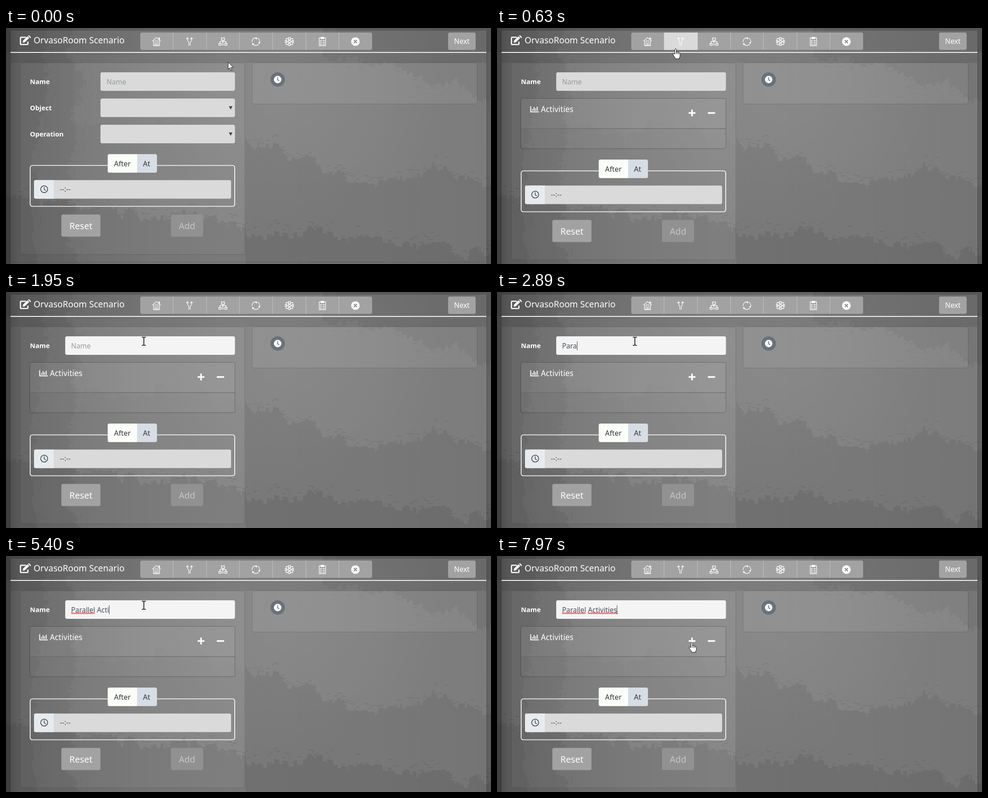
Animation of 1073 by 522 pixels, one loop 8000 ms. Source, as an HTML page with a canvas:

```html
<!DOCTYPE html>
<html lang="en">
<head>
<meta charset="utf-8">
<title>Scenario form</title>
<style>
html, body { margin: 0; width: 100%; height: 100%; overflow: hidden; background: #555; }
canvas, svg { position: absolute; left: 0; top: 0; width: 1073px; height: 522px; }
text { font: 15.4px "Noto Sans", "Open Sans", sans-serif; fill: #fff; white-space: pre; }
.b { font-weight: 700; font-size: 14.7px; }
.title { font-size: 19.3px; }
.big { font-size: 19.6px; }
.head { font-size: 17.3px; }
.ink { fill: #495057; }
.dark { fill: #30363c; }
.hint { fill: #969a9e; }
.input { fill: #dadada; }
.btn { fill: #a2a2a2; }
.card { fill: #fff; fill-opacity: .04; }
.edge { fill: none; stroke: #000; stroke-opacity: .17; }
.line { fill: none; stroke: #fff; stroke-width: 1.3; }
</style>
</head>
<body>
<canvas id="bg" width="1073" height="522"></canvas>
<svg viewBox="0 0 1073 522">
  <rect id="frame" class="edge" x="9.5" y="5.5" width="1054" height="512" rx="4"/>
  <rect x="10" y="53" width="1053" height="2" fill="#f2f2f2"/>

  <!-- header -->
  <g transform="translate(30 16)">
    <path d="M14 4.500H3.500Q2 4.500 2 6V19Q2 20.500 3.500 20.500H17Q18.500 20.500 18.500 19V14" fill="none" stroke="#fff" stroke-width="2.6"/>
    <path d="M7 16.500L7.600 12 17.500 2.200 21.300 6 11.500 15.800ZM18.600 1.100Q20.300-.6 22 1.100L24.400 3.500Q26 5.200 24.400 6.800L22.400 4.900Z" fill="#fff"/>
  </g>
  <text class="title" x="61" y="34">OrvasoRoom</text>
  <text class="title" x="184" y="34">Scenario</text>
  <rect class="btn" x="297" y="10" width="513" height="38.500" rx="4"/>
  <path id="seams" stroke="#c0c0c0" stroke-width="1"/>
  <rect id="hover" x="370" y="10" width="74" height="38.500" fill="#dadada" opacity="0"/>
  <g class="line">
    <g transform="translate(333 30)">
      <path d="M-9-1L0-9 9-1M-6.500-2V9H6.500V-2M5-5V-8H7V-3"/>
      <path d="M-4-2H4M-5 1H5M-5 4H-2M2 4H5M-5 7H-2M2 7H5M-1 9V4H1V9" stroke-width="1"/>
    </g>
    <path id="fork" transform="translate(406 30)" d="M-1.500 9V4Q-1.500 1-3.500-1-4.500-3-4.500-8M-7-5.500L-4.500-8.500-2-5.500M1.500 9V4Q1.500 1 3.500-1 4.500-3 4.500-8M2-5.500L4.500-8.500 7-5.500"/>
    <path transform="translate(480 30)" d="M-3.500-8H3.500V-3H-3.500ZM-9 4H-4V8H-9ZM4 4H9V8H4ZM0-3V6M-6.500 4V0H6.500V4M-2 7H2"/>
    <g transform="translate(553 30)">
      <path d="M-8.500 1A8.500 8.500 0 0 1 2-8.200M4.500-7.300A8.500 8.500 0 0 1 8 2.500M6 6A8.500 8.500 0 0 1-7 5"/>
      <path d="M-1-9L4-7.500 0-4.500ZM9.500 1L7 6 5 1.500ZM-8.500 8L-8.500 3-4 5Z" fill="#fff" stroke="none"/>
    </g>
    <path transform="translate(627 30)" d="M-2.500-8.500H2.500V-4.500H-2.500ZM-2.500-2H2.500V2H-2.500ZM-2.500 4.500H2.500V8.500H-2.500ZM-9-2H-6V2H-9ZM6-2H9V2H6ZM-2.500-6.500H-7.500V-2M-7.500 2V6.500H-2.500M2.500-6.500H7.500V-2M7.500 2V6.500H2.500M0-4.500V-2M0 2V4.500M-6 0H-2.500M2.500 0H6"/>
    <g transform="translate(700 30)">
      <path d="M-7-8H7V9H-7ZM-3-9.500H3V-6.500H-3Z"/>
      <path d="M-5-2L-4-1-2-3.500M0-2H5M-5 2L-4 3-2 .5M0 2H5M-5 6L-4 7-2 4.500M0 6H5"/>
    </g>
  </g>
  <circle cx="773" cy="30" r="9.500" fill="#fff"/>
  <path d="M769.500 26.500l7 7m0-7l-7 7" stroke="#929292" stroke-width="2.300"/>
  <rect class="btn" x="978" y="10" width="61" height="38.500" rx="4"/>
  <text x="1008.500" y="35" text-anchor="middle" style="font-size:15.700px">Next</text>

  <!-- panels -->
  <rect id="panel" class="card" x="31" y="77" width="497" height="424" rx="4"/>
  <rect id="panelEdge" class="edge" x="31.500" y="77" width="497" height="424" rx="4"/>
  <rect class="card" x="544" y="77" width="498" height="91" rx="4" style="fill-opacity:.07"/>
  <rect class="edge" x="544.500" y="77" width="498" height="91" rx="4"/>
  <circle cx="601" cy="114" r="16" fill="#69727b"/>
  <circle cx="601" cy="114" r="8.300" fill="#fff"/>
  <path d="M601 109V114.500L604 117" fill="none" stroke="#69727b" stroke-width="1.700"/>

  <text class="b" x="53" y="124">Name</text>
  <g id="single">
    <rect class="input" x="209" y="98" width="297.500" height="41" rx="4"/>
    <text class="hint" x="222.500" y="125">Name</text>
    <text class="b" x="53" y="182">Object</text>
    <text class="b" x="53" y="240">Operation</text>
    <rect class="input" x="209" y="156" width="297.500" height="41" rx="4"/>
    <rect class="input" x="209" y="214" width="297.500" height="41" rx="4"/>
    <path d="M493 173h8l-4 7.500zM493 231h8l-4 7.500z" fill="#464646"/>
  </g>
  <g id="multi">
    <rect id="name" x="131" y="98" width="375.500" height="41" rx="4"/>
    <text id="hint" class="hint" x="144" y="125">Name</text>
    <text id="typed" class="ink" x="144" y="125"></text>
    <path id="wave1" fill="none" stroke="#e02f35" stroke-width="1.100"/>
    <path id="wave2" fill="none" stroke="#e02f35" stroke-width="1.100"/>
    <rect id="caret" y="109" width="1" height="20" fill="#444"/>
    <rect class="card" x="53" y="156" width="453.500" height="110.500" rx="4"/>
    <rect class="card" x="53" y="156" width="453.500" height="66" rx="4"/>
    <rect class="edge" x="52.500" y="155.500" width="454" height="111.500" rx="4" style="stroke-opacity:.27"/>
    <path d="M53 222.500H506" stroke="#666"/>
    <path d="M74.500 173V185.500H92.500M78.500 183V179M82 183V175M85.500 183V177.500M89 183V174" fill="none" stroke="#fff" stroke-width="1.900"/>
    <text class="head" x="97" y="186">Activities</text>
    <path d="M424 188h15m-7.500-7.500v15M466.500 188h16" stroke="#fff" stroke-width="3.400"/>
  </g>

  <!-- schedule and actions -->
  <g id="lower">
    <rect class="line" x="53.500" y="304" width="452.500" height="90.500" rx="5" style="stroke-width:1.700"/>
    <path d="M229 279H290V320H229Q225 320 225 316V283Q225 279 229 279Z" fill="#fbfdf9"/>
    <path d="M290 279H330Q334 279 334 283V316Q334 320 330 320H290Z" fill="#d7dde4"/>
    <text class="dark" x="239" y="306" style="font-size:15.900px">After</text>
    <text class="dark" x="303" y="306" style="font-size:15.900px">At</text>
    <rect class="input" x="62" y="336.500" width="436" height="41" rx="4"/>
    <path d="M106 336.500H66Q62 336.500 62 340.500V373.500Q62 377.500 66 377.500H106Z" fill="#e8ebee"/>
    <path d="M106.500 336.500V377.500" stroke="#cfd4d9"/>
    <circle cx="84.500" cy="356.500" r="7.700" fill="none" stroke="#495057" stroke-width="1.700"/>
    <path d="M84.500 351.500V357L88 359.500" fill="none" stroke="#495057" stroke-width="1.600"/>
    <text class="ink" x="119" y="362">--:--</text>
    <rect class="btn" x="122.500" y="412.500" width="86.500" height="49" rx="4"/>
    <text class="big" x="165.700" y="444.500" text-anchor="middle">Reset</text>
    <rect x="365" y="412.500" width="71" height="49" rx="4" fill="#919191"/>
    <text class="big" x="400.500" y="444.500" text-anchor="middle" style="fill:#c6c6c6">Add</text>
  </g>

  <!-- pointers, origin at the hot spot -->
  <path id="arrow" d="M.5.500V16.500L4.200 13 6.800 19.200 9.200 18.200 6.600 12.200H11.700Z" fill="#fff" stroke="#111"/>
  <path id="hand" d="M-1.800 1.500Q-1.600 0 0 0 1.700 0 1.700 1.500V8Q2 6.800 3.300 6.900 4.700 7 4.800 8.300 5.200 7.400 6.300 7.600 7.500 7.900 7.500 9 8.200 8.400 9.100 8.800 10 9.300 10 10.500V15Q10 17.500 8.500 19.500V22H-.8V20Q-3 17.500-4.200 14.800L-5.800 12Q-6.300 10.500-5 10-3.500 9.700-1.800 12ZM1.700 8V12M4.800 8.300V12M7.500 9V12" fill="#fff" stroke="#111"/>
  <path id="beam" d="M-4.500-9H-1.500L0-8 1.500-9H4.500M0-8V8M-4.500 9H-1.500L0 8 1.500 9H4.500" fill="none" stroke="#111" stroke-width="1.700"/>
</svg>
<script>
const $ = id => document.getElementById(id);
const LOOP = 8000, W = 1073, H = 522;

// ---- soft, posterised backdrop ----
const ctx = $('bg').getContext('2d');
let seed = 11;
const rnd = () => (seed = seed * 16807 % 2147483647) / 2147483647;

function lerp(pts, p) {
  let i = 1;
  while (i < pts.length - 1 && pts[i][0] < p) i++;
  const [a, u] = pts[i - 1], [b, v] = pts[i];
  return u + (v - u) * (p - a) / (b - a);
}

// Tint one side of a ragged contour; "upright" swaps the axes.
function ridge(pts, far, tint, rough, upright) {
  const put = (a, b, n, m) => upright ? ctx.rect(b, a, m, n) : ctx.rect(a, b, n, m);
  const end = pts[pts.length - 1][0], dir = Math.sign(far - pts[0][1]);
  let drift = 0;
  ctx.fillStyle = tint;
  ctx.beginPath();
  for (let p = pts[0][0]; p < end;) {
    const n = 2 + Math.floor(rnd() * 8);
    drift = drift * .75 + (rnd() - .5) * rough;
    const edge = Math.round((lerp(pts, p) + drift) / 2) * 2;
    put(p, Math.min(edge, far), Math.min(n, end - p), Math.abs(far - edge));
    if (rnd() < .4) put(p, edge - dir * (4 + Math.floor(rnd() * rough)), n + 2, 2);
    p += n;
  }
  ctx.fill();
}

function backdrop() {
  const base = ctx.createLinearGradient(0, 0, W, 0);
  [[0, '#5c5c5c'], [.03, '#6c6c6c'], [.14, '#757575'], [.3, '#7f7f7f'], [.45, '#838383'], [.75, '#808080'], [1, '#7c7c7c']]
    .forEach(([o, c]) => base.addColorStop(o, c));
  ctx.fillStyle = base;
  ctx.fillRect(0, 0, W, H);
  const glow = ctx.createRadialGradient(640, 120, 20, 640, 120, 330);
  glow.addColorStop(0, 'rgba(255,255,255,.06)');
  glow.addColorStop(1, 'rgba(255,255,255,0)');
  ctx.fillStyle = glow;
  ctx.fillRect(0, 0, W, H);

  ridge([[0, 150], [90, 160], [180, 142], [240, 162], [330, 126], [430, 145], [522, 160]], 0, 'rgba(0,0,0,.05)', 22, true);
  ridge([[0, 92], [150, 84], [260, 66], [400, 50], [522, 60]], 0, 'rgba(0,0,0,.05)', 14, true);
  ridge([[150, 210], [220, 225], [300, 240], [340, 205], [410, 222], [530, 250]], 60, 'rgba(255,255,255,.018)', 18);
  ridge([[530, 250], [610, 275], [700, 320], [800, 350], [900, 335], [970, 310], [1073, 350]], H, 'rgba(0,0,0,.065)', 20);
  ridge([[0, 372], [120, 395], [240, 405], [340, 425], [440, 415], [530, 442]], H, 'rgba(0,0,0,.08)', 20);
  ridge([[530, 445], [650, 450], [760, 462], [860, 478], [960, 500], [1073, 488]], H, 'rgba(0,0,0,.08)', 22);
  ridge([[700, 58], [790, 76], [880, 96], [960, 120], [1073, 160]], 0, 'rgba(0,0,0,.055)', 18);

  ctx.fillStyle = 'rgba(0,0,0,.09)';
  ctx.fillRect(0, 0, W, 53);
  ctx.fillRect(10, 55, 1053, 22);
  ctx.fillStyle = 'rgba(0,0,0,.2)';
  ctx.fillRect(0, 0, 10, H);
  ctx.fillRect(1063, 0, 10, H);
  ctx.fillRect(10, 0, 1053, 5);
}
backdrop();

// ---- timeline ----
const pointer = [
  [0, 491, 75, 'arrow'], [80, 481, 70, 'arrow'], [160, 459, 62, 'arrow'], [240, 435, 53, 'arrow'],
  [310, 415, 37, 'hand'], [390, 405, 28, 'hand'], [630, 395, 46, 'hand'], [720, 374, 63, 'arrow'],
  [800, 348, 82, 'arrow'], [870, 327, 103, 'beam'], [940, 316, 110, 'beam'], [1020, 309, 112, 'beam'],
  [1190, 306, 110, 'beam'], [1650, 305, 110, 'beam'], [1880, 305, 109, 'beam'], [7090, 326, 135, 'beam'],
  [7240, 339, 148, 'arrow'], [7320, 353, 157, 'arrow'], [7400, 368, 165, 'arrow'], [7480, 383, 172, 'arrow'],
  [7560, 397, 178, 'arrow'], [7640, 409, 183, 'arrow'], [7720, 418, 186, 'arrow'], [7800, 425, 188, 'hand'],
  [7890, 429, 190, 'hand'], [7970, 431, 191, 'hand']
];
const hover = [[0, 0], [310, .5], [390, 1], [720, .55], [800, .15], [870, 0]];
const focus = [[0, 0], [1330, .35], [1400, .75], [1480, 1]];
const caret = [[0, 0], [1400, 1], [1950, 0], [2360, 1], [4140, 0], [4300, 1], [7010, 0], [7560, 1]];
const phrase = 'Parallel Activities';
const keys = [2360, 2490, 2720, 2890, 3190, 3350, 3450, 3600, 4300, 4540, 4940, 5240, 5400, 5640, 5780, 6180, 6240, 6400, 6550];

const at = (rows, t) => rows.reduce((hit, row) => row[0] <= t ? row : hit);
const show = (id, on) => $(id).style.display = on ? '' : 'none';

function wave(x0, x1) {
  let d = `M${x0} 128`;
  for (let x = x0 + 2, up = true; x <= x1; x += 2, up = !up) d += `L${x} ${up ? 125.5 : 128}`;
  return d;
}
$('wave1').setAttribute('d', wave(144, 197));
$('wave2').setAttribute('d', wave(201, 267));
$('seams').setAttribute('d', [1, 2, 3, 4, 5, 6].map(i => `M${Math.round(297 + i * 73.3) - .5} 10V48.5`).join(''));

let lastCount = -1;
function draw(t) {
  const multi = t >= 630, grow = multi ? 12 : 0;
  show('single', !multi);
  show('multi', multi);
  $('lower').setAttribute('transform', `translate(0 ${grow})`);
  $('frame').setAttribute('height', 512 + grow);
  for (const id of ['panel', 'panelEdge']) $(id).setAttribute('height', 424 + grow);

  const lit = at(hover, t)[1];
  $('hover').setAttribute('opacity', lit);
  $('fork').setAttribute('opacity', t >= 540 && t < 630 ? .7 : 1);
  const shade = Math.round(218 + 26 * at(focus, t)[1]);
  $('name').setAttribute('fill', `rgb(${shade},${shade},${shade})`);

  const count = keys.filter(k => k <= t).length;
  if (count !== lastCount) {
    $('typed').textContent = phrase.slice(0, count);
    lastCount = count;
  }
  show('hint', !count);
  show('wave1', t >= 4300);
  show('wave2', t >= 7560);
  show('caret', at(caret, t)[1]);
  if (multi) $('caret').setAttribute('x', Math.round(144 + (count ? $('typed').getComputedTextLength() : 0)));

  const [, x, y, kind] = at(pointer, t);
  for (const id of ['arrow', 'hand', 'beam']) show(id, id === kind);
  $(kind).setAttribute('transform', `translate(${x} ${y})`);
}

const start = performance.now();
function tick() {
  draw((performance.now() - start) % LOOP);
  requestAnimationFrame(tick);
}
tick();
</script>
</body>
</html>
```
